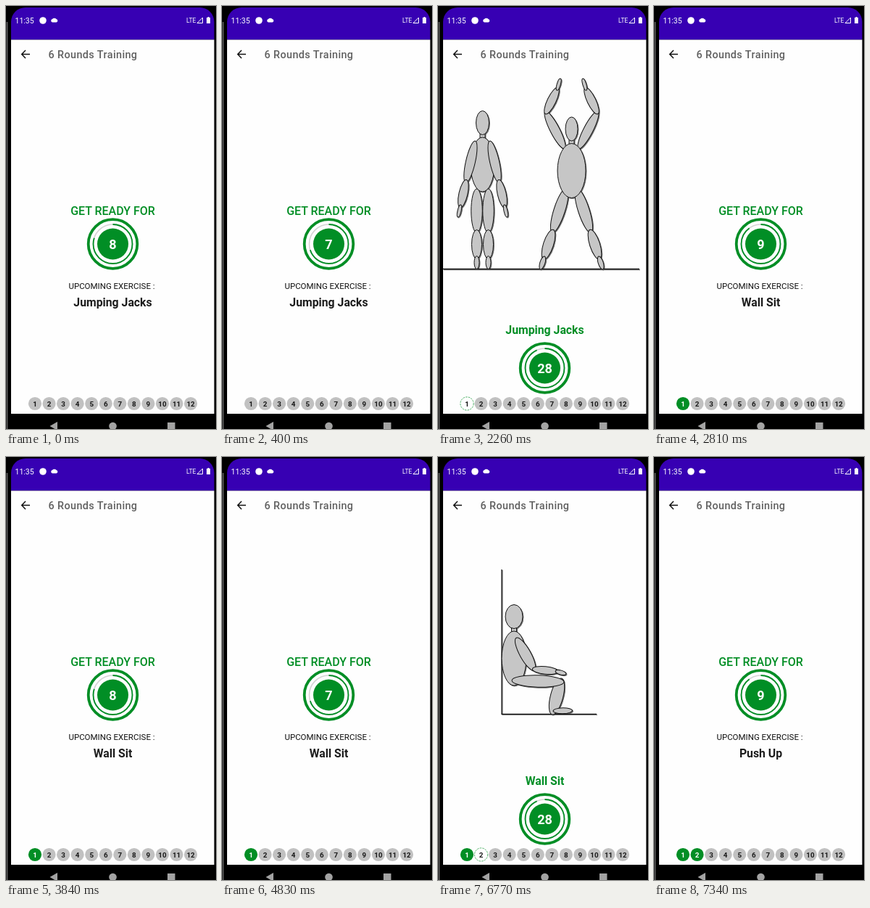
These frames come from a looping animation (290x583 px, 8000 ms). An HTML page:

```html
<!DOCTYPE html>
<html lang="en">
<head>
<meta charset="utf-8">
<title>Workout timer</title>
<style>
  html, body { margin: 0; width: 100%; height: 100%; overflow: hidden; background: #000; }
  svg { display: block; width: 100%; height: 100%; font-family: Roboto, sans-serif; }
  .mid { text-anchor: middle; }
  .title { font-weight: 500; font-size: 14.4px; letter-spacing: .4px; fill: #606060; }
  .heading { font-weight: 500; font-size: 16px; }
  .name { font-weight: 700; font-size: 15.8px; }
  .count { font-weight: 700; font-size: 18px; }
  .badge { font-weight: 700; font-size: 9.8px; }
  .label { font-size: 11.5px; }
  .figure { fill: #c6c6c6; stroke: #111; filter: drop-shadow(1px 1px .7px #0008); }
</style>
</head>
<body>
<svg viewBox="0 0 290 583">
  <rect width="290" height="583"/>
  <path d="M1.500 583V22" stroke="#6c6c6c" stroke-width="1.500"/>
  <path d="M7 46.500V22A20 20 0 0 1 27 2H267.500A20 20 0 0 1 287.500 22V46.500Z" fill="#3700b3"/>
  <path d="M7 46.500H287.500V562H7Z" fill="#fefefe"/>

  <g fill="#fff">
    <text x="12.500" y="24" font-size="10.500">11:35</text>
    <circle cx="51" cy="20" r="4.800"/>
    <path d="M64 22.500a2.300 2.300 0 0 1 0-4.500a3.500 3.500 0 0 1 5.500 0a2.300 2.300 0 0 1 0 4.500Z"/>
    <text x="249" y="23" font-size="8.500">LTE</text>
    <path d="M264 23.500L271.500 16V23.500Z" fill="none" stroke="#fff"/>
    <path d="M277 16H278.500V15H280.500V16H282V24H277Z"/>
  </g>

  <path d="M33 66.500H22M27 61L21.700 66.500L27 72" fill="none" stroke="#111" stroke-width="1.500"/>
  <text x="58.500" y="72" class="title">6 Rounds Training</text>

  <g fill="#a3a3a3">
    <path d="M71 573V585L60.500 579Z"/>
    <circle cx="147.500" cy="579" r="5.300"/>
    <path d="M223 574H233.500V584H223Z"/>
  </g>
  <g id="scene"></g>
</svg>
<script>
const GREEN = '#018e25', CENTER = 147.5;
const LOOP = 8000, TICK = 1010;
const ARM = [13, 12, 5], LEG = [15.5, 14, 7];

// Each phase counts down from `first`, one step per tick
const phases = [
  { start: -610, mode: 'rest', index: 0, first: 8 },
  { start: 1240, mode: 'work', index: 0, first: 29 },
  { start: 2810, mode: 'rest', index: 1, first: 9 },
  { start: 5740, mode: 'work', index: 1, first: 29 },
  { start: 7340, mode: 'rest', index: 2, first: 9 },
];
const exercises = ['Jumping Jacks', 'Wall Sit', 'Push Up'];

const text = (content, y, cls, fill, x = CENTER) =>
  `<text x="${x}" y="${y}" class="mid ${cls}" fill="${fill}">${content}</text>`;

// An ellipse from one joint to the next, reaching slightly past both
function bone([x1, y1], [x2, y2], width, reach = 2) {
  const angle = Math.atan2(y2 - y1, x2 - x1) * 180 / Math.PI;
  return `<ellipse rx="${Math.hypot(x2 - x1, y2 - y1) / 2 + reach}" ry="${width / 2}"
    transform="translate(${(x1 + x2) / 2} ${(y1 + y2) / 2}) rotate(${angle})"/>`;
}

// Three bones from root to tip, with the middle joint pushed sideways by `bend`
function limb([x1, y1], [x2, y2], widths, bend = 0) {
  const dx = x2 - x1, dy = y2 - y1, length = Math.hypot(dx, dy);
  const joint = (along, push) => [
    x1 + dx * along - dy / length * push,
    y1 + dy * along + dx / length * push,
  ];
  const joints = [joint(0, 0), joint(.53, bend), joint(.87, bend * .2), joint(1, 0)];
  return widths.map((width, i) => bone(joints[i], joints[i + 1], width)).join('');
}

const mirrored = (axis, shape) =>
  `${shape}<g transform="translate(${2 * axis}) scale(-1 1)">${shape}</g>`;

function body(x, top, headWidth, torsoWidth) {
  const chin = top + 33, shoulders = chin + 3.5;
  return `<rect x="${x - 3.5}" y="${chin - 2}" width="7" height="9"/>` +
    bone([x, top], [x, chin], headWidth, 0) +
    bone([x, shoulders], [x, shoulders + 75], torsoWidth, 0);
}

const line = d => `<path d="${d}" fill="none" stroke-width="1.3"/>`;

const standing = mirrored(61.5, limb([53.5, 254], [53.5, 360.5], LEG)) +
  body(61.5, 144.5, 18, 33) +
  mirrored(61.5, limb([51, 188], [28, 289], ARM));

const jumping = mirrored(184.5,
  limb([177, 253], [142, 361], LEG) + limb([174, 195], [168.5, 102], ARM, -22)) +
  body(184.5, 153, 17, 39);

const sitting = body(105, 203.5, 24, 34) +
  bone([170, 307], [158, 353], 17.5) +
  bone([104, 308], [172, 310], 16.5) +
  bone([161, 350], [183.5, 349.5], 8) +
  limb([109, 251], [175, 298.5], [15, 10.5, 6], 20);

const figures = [
  line('M7 362.500H278') + standing + jumping,
  line('M88 155V354.300H219') + sitting,
];

function dial(y, left, total) {
  return `<g transform="translate(${CENTER} ${y})">
    <g fill="none">
      <circle r="33.8" stroke="${GREEN}" stroke-width="3.8"/>
      <circle r="27" stroke="#d4d4d4" stroke-width="1.6"/>
      <circle r="27" stroke="${GREEN}" stroke-width="1.8" pathLength="100"
        stroke-dasharray="${100 * left / total} 100" transform="rotate(-90)"/>
    </g>
    <circle r="21.5" fill="${GREEN}"/>
    ${text(left, 6.5, 'count', '#fff', 0)}</g>`;
}

function badge(i, mode, current) {
  const done = i < current, active = i === current && mode === 'work';
  const x = 40 + 19.55 * i;
  const fill = done ? GREEN : active ? '#fff' : '#c1c1c1';
  const border = active ? `stroke="${GREEN}" stroke-width=".7" stroke-dasharray="2.5 1.2"` : '';
  return `<circle cx="${x}" cy="548" r="9.1" fill="${fill}" ${border}/>` +
    text(i + 1, 551.6, 'badge', done ? '#fff' : '#181818', x);
}

function scene({ mode, index }, left) {
  const badges = Array.from({ length: 12 }, (_, i) => badge(i, mode, index)).join('');
  const name = exercises[index];
  if (mode === 'work') {
    return `<g class="figure">${figures[index]}</g>` +
      text(name, 451.7, 'name', GREEN) + dial(499, left, 30) + badges;
  }
  return text('GET READY FOR', 287.5, 'heading', GREEN) + dial(328, left, 10) +
    text('UPCOMING EXERCISE :', 390, 'label', '#111', 146) +
    text(name, 414, 'name', '#1c1c1c') + badges;
}

const stage = document.getElementById('scene');
const begin = performance.now();
let shown;
function draw() {
  const time = (performance.now() - begin) % LOOP;
  const phase = phases.findLast(({ start }) => start <= time);
  const markup = scene(phase, phase.first - Math.floor((time - phase.start) / TICK));
  if (markup !== shown) stage.innerHTML = shown = markup;
  requestAnimationFrame(draw);
}
draw();
</script>
</body>
</html>
```
